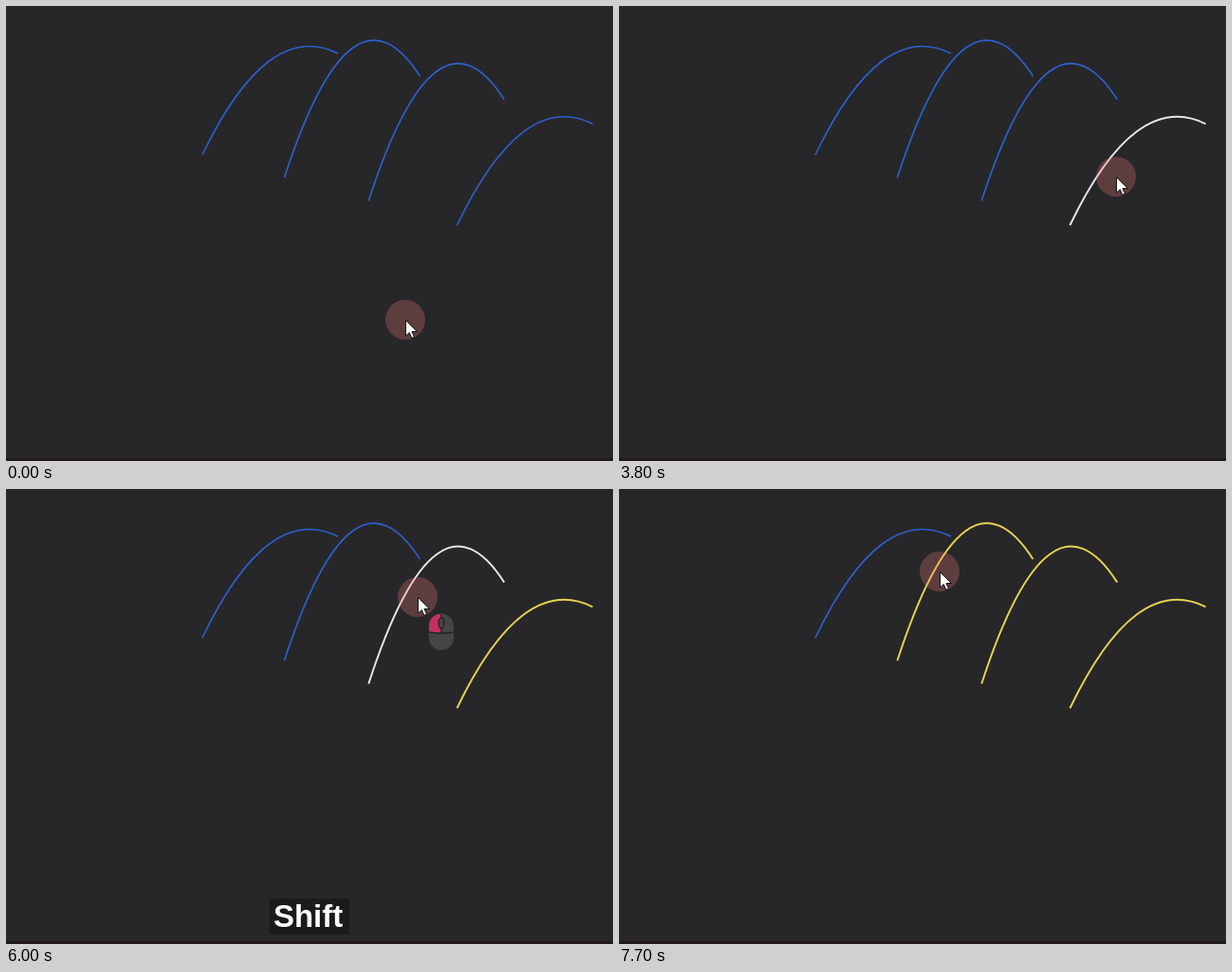
An HTML page with a canvas that plays this animation: 640x480 px, repeating every 8000 ms.

```html
<!DOCTYPE html>
<html lang="en">
<head>
<meta charset="utf-8">
<title>Selecting curves</title>
<style>
html, body { margin: 0; width: 100%; height: 100%; overflow: hidden; background: #272729; }
canvas { display: block; }
</style>
</head>
<body>
<canvas id="stage" width="640" height="480"></canvas>
<script>
const ctx = document.getElementById('stage').getContext('2d');
const LOOP = 8000, STEP = 100, LAG = 60;
const BLUE = '#2c60d0', WHITE = '#e6e6e6', YELLOW = '#e6d24e';

// Quadratic curves: start, control and end, with hover and select times.
const wide = [207, 157, 276, 13, 350, 50];
const tall = [293.5, 181, 364.7, -38, 436.5, 74];
const curves = [
  { pts: wide, dx: 0, dy: 0, hover: Infinity, select: Infinity },
  { pts: tall, dx: 0, dy: 0, hover: 6900, select: 7600 },
  { pts: tall, dx: 88.8, dy: 24.5, hover: 5500, select: 6100 },
  { pts: wide, dx: 268.5, dy: 74.3, hover: 3500, select: 4500 }
];

const moves = [
  { at: 2850, dur: 790, path: [421, 331, 492, 262, 524, 173] },
  { at: 3640, dur: 100, path: [524, 173, 524, 177, 524, 180] },
  { at: 5050, dur: 540, path: [524, 180, 479, 141, 434, 114] },
  { at: 6450, dur: 590, path: [434, 114, 386, 78, 338, 87] }
];

const clicks = [[4400, 4700], [6000, 6200], [7500, 7700]];

const labels = [
  { text: '2', from: 2000, to: 2900, box: [304, 433, 30, 37] },
  { text: 'Shift', from: 5100, to: 6200, box: [278, 432, 84, 38] }
];

const within = (t, from, to) => t >= from && t < to;
const ease = u => u * u * (3 - 2 * u);

function quad([x0, y0, x1, y1, x2, y2], u) {
  const a = (1 - u) * (1 - u), b = 2 * u * (1 - u), c = u * u;
  return { x: a * x0 + b * x1 + c * x2, y: a * y0 + b * y1 + c * y2 };
}

function pointerAt(t) {
  let move = moves[0];
  for (const m of moves) if (t >= m.at) move = m;
  const u = Math.min(1, Math.max(0, (t - move.at) / move.dur));
  return quad(move.path, ease(u));
}

function drawCurve(c, t) {
  const [x0, y0, x1, y1, x2, y2] = c.pts;
  const active = t >= c.hover;
  ctx.save();
  ctx.translate(c.dx, c.dy);
  ctx.beginPath();
  ctx.moveTo(x0, y0);
  ctx.quadraticCurveTo(x1, y1, x2, y2);
  ctx.strokeStyle = t >= c.select ? YELLOW : active ? WHITE : BLUE;
  ctx.lineWidth = active ? 2 : 1.6;
  ctx.stroke();
  ctx.restore();
}

function drawHalo(p) {
  ctx.fillStyle = 'rgba(250,125,125,0.26)';
  ctx.beginPath();
  ctx.arc(p.x, p.y, 21, 0, Math.PI * 2);
  ctx.fill();
}

function drawArrow(p) {
  const shape = new Path2D('M0 0V16.5L3.8 13L6.3 18.8L9 17.7L6.5 12H11.8Z');
  ctx.save();
  ctx.translate(Math.round(p.x) + 0.5, Math.round(p.y) + 0.5);
  ctx.fillStyle = '#fff';
  ctx.strokeStyle = '#111';
  ctx.lineWidth = 1;
  ctx.fill(shape);
  ctx.stroke(shape);
  ctx.restore();
}

function drawMouse(p) {
  ctx.save();
  ctx.translate(p.x + 25, p.y + 36.5);
  ctx.beginPath();
  ctx.roundRect(-13, -19, 26, 38.5, 13);
  ctx.fillStyle = '#454547';
  ctx.fill();
  ctx.clip();
  ctx.fillStyle = '#c43061';
  ctx.fillRect(-13, -19, 13, 20);
  ctx.strokeStyle = '#242426';
  ctx.lineWidth = 1.4;
  ctx.beginPath();
  ctx.moveTo(-13, 0.5);
  ctx.quadraticCurveTo(0, 3, 13, 0.5);
  ctx.moveTo(0, -19);
  ctx.lineTo(0, 1);
  ctx.stroke();
  ctx.fillStyle = '#454547';
  ctx.beginPath();
  ctx.ellipse(0, -9, 2.9, 5.5, 0, 0, Math.PI * 2);
  ctx.fill();
  ctx.stroke();
  ctx.restore();
}

function drawLabel({ text, box }) {
  ctx.fillStyle = '#1b1b1c';
  ctx.beginPath();
  ctx.roundRect(...box, 2);
  ctx.fill();
  ctx.font = 'bold 33px "Liberation Sans", Arial, sans-serif';
  ctx.textAlign = 'center';
  ctx.fillStyle = '#fff';
  ctx.fillText(text, 318.6, 462);
}

function draw(t) {
  ctx.fillStyle = '#272729';
  ctx.fillRect(0, 0, 640, 480);
  ctx.fillStyle = '#21191d';
  ctx.fillRect(0, 477, 640, 3);
  curves.forEach(c => drawCurve(c, t));
  const p = pointerAt(t);
  drawHalo(pointerAt(t - LAG));
  if (clicks.some(([from, to]) => within(t, from, to))) drawMouse(p);
  drawArrow(p);
  labels.filter(l => within(t, l.from, l.to)).forEach(drawLabel);
}

const start = performance.now();
function tick() {
  const t = (performance.now() - start) % LOOP;
  draw(Math.floor(t / STEP) * STEP);
  requestAnimationFrame(tick);
}
tick();
</script>
</body>
</html>
```
